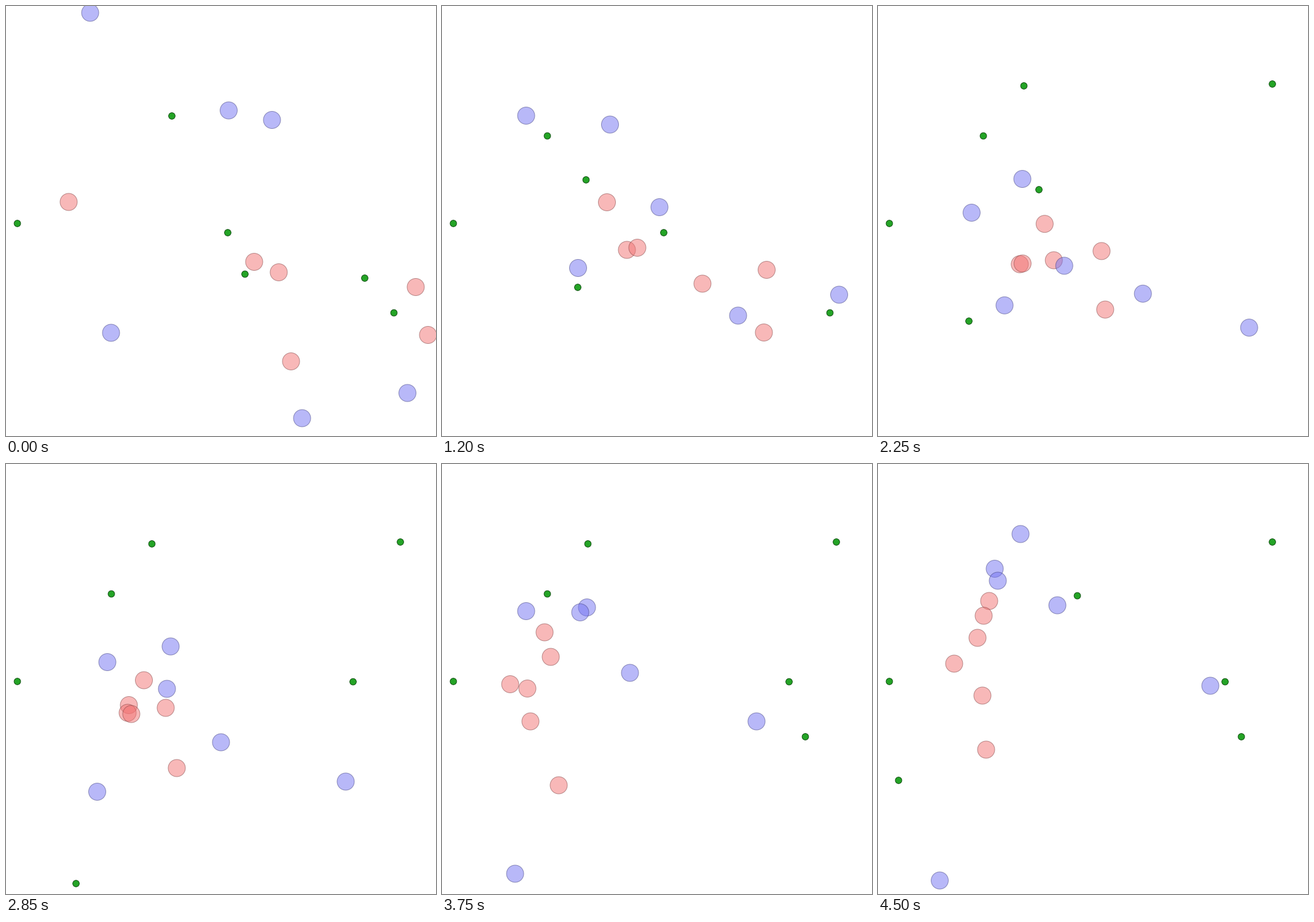
Animation, 700 px wide and 700 px high, one loop 4.65 s. Source, as a matplotlib script:

```python
import numpy as np
import matplotlib.pyplot as plt
from matplotlib.animation import FuncAnimation
from matplotlib.patches import Circle

SIZE, FRAMES, STEP = 700, 31, 150
TOP_SPEED, DAMPING = 28, 0.25
RED, BLUE, GREEN = (.95, .45, .45), (.45, .45, .95), (.14, .645, .15)

# Waypoints of every agent at the key times
KEYS = [0, 4, 8, 12, 19, 25, 30]
REDS = [
    [(102, 319), (171, 319), (268.5, 319.5), (297, 337), (224.5, 352), (167, 274), (181, 223)],
    [(404, 416.5), (353, 419), (301, 397), (259, 414), (200, 392.5), (177, 314), (172, 247)],
    [(444, 433.5), (384.5, 424), (318, 393.5), (263.5, 411), (198, 405), (139, 365.5), (162, 283)],
    [(464, 578.5), (464, 510), (424, 452), (348, 421), (204, 407), (111, 358.5), (124, 325)],
    [(667, 457.5), (598, 457.5), (528.5, 429.5), (440.5, 410), (260, 397), (144, 419), (170, 377)],
    [(687, 535.5), (618.5, 535.5), (524, 531.5), (438, 511), (278, 495), (190, 523), (176, 465)],
]
BLUES = [
    [(137, 11), (137, 80), (137, 178.5), (137, 286), (165, 322.5), (137, 239.5), (190, 170.5)],
    [(362.5, 170), (360, 235.5), (354, 327.5), (333, 413), (262, 366), (236, 233.5), (232, 114)],
    [(433, 185.5), (364.5, 185.5), (273.5, 193), (221, 242.5), (268, 297), (225, 241.5), (195, 190)],
    [(171, 532), (185, 478), (221.5, 426.5), (236, 463), (148.5, 533.5), (119, 667), (100.5, 678)],
    [(653.5, 630), (653.5, 561), (646.5, 470), (632, 486), (553, 517), (512, 419), (541, 361)],
    [(482, 671), (482, 602), (482, 504), (476, 462.5), (350, 453), (306, 340), (292, 230)],
]
# Food jumps to a new spot when eaten: (start, x, y)
FOOD = [
    [(0, 270, 179), (8, 221, 458), (11, 148, 513), (18, 114, 683), (25, 591.5, 444)],
    [(0, 18.5, 354)],
    [(0, 361, 369), (10, 262, 299), (17, 565, 354.5)],
    [(0, 389, 436.5), (2, 234.5, 283), (15, 237.5, 130), (29, 324.5, 214.5)],
    [(0, 584, 443), (5, 171.5, 211.5), (27, 33.5, 515)],
    [(0, 631.5, 499.5), (12, 642, 127)],
]


def solve_paths(points):
    """Damped point masses with limited, smooth thrust through all waypoints."""
    n = np.arange(FRAMES)
    lag = n[:, None] - n
    speed = np.where(lag >= 0, (1 - DAMPING) ** np.maximum(lag, 0), 0)
    speed *= TOP_SPEED * DAMPING
    speed[0] = 0
    response = np.cumsum(speed, axis=0)
    hit = response[KEYS[1:]]
    goal = (points[:, 1:] - points[:, :1]).transpose(1, 0, 2)
    goal = goal.reshape(len(KEYS) - 1, -1)

    diff = np.diff(np.eye(FRAMES), axis=0)
    smooth = np.linalg.inv(diff.T @ diff + 0.02 * np.eye(FRAMES))
    gain = smooth @ hit.T @ np.linalg.inv(hit @ smooth @ hit.T)
    thrust = gain @ goal
    for _ in range(400):
        thrust = np.clip(thrust, -1, 1)
        thrust += gain @ (goal - hit @ thrust)
    moved = (response @ thrust).reshape(FRAMES, len(points), 2)
    return points[:, 0] + moved


def disc(radius, color, alpha):
    edge = [c / 2 for c in color]
    return ax.add_patch(Circle((0, 0), radius, fc=(*color, alpha),
                               ec=(*edge, alpha), lw=0.72))


fig = plt.figure(figsize=(SIZE / 100, SIZE / 100), dpi=100, facecolor="white")
ax = fig.add_axes([0, 0, 1, 1])
ax.set(xlim=(0, SIZE), ylim=(SIZE, 0))
ax.axis("off")

paths = solve_paths(np.array(REDS + BLUES, float))
agents = [disc(14, c, 0.5) for c in [RED] * len(REDS) + [BLUE] * len(BLUES)]
foods = [disc(5.3, GREEN, 1) for _ in FOOD]


def draw(i):
    for agent, spot in zip(agents, paths[i]):
        agent.center = tuple(spot)
    for food, stops in zip(foods, FOOD):
        food.center = [s for s in stops if s[0] <= i][-1][1:]
    return agents + foods


anim = FuncAnimation(fig, draw, frames=FRAMES, interval=STEP,
                     repeat=True, repeat_delay=0)
plt.show()
```
